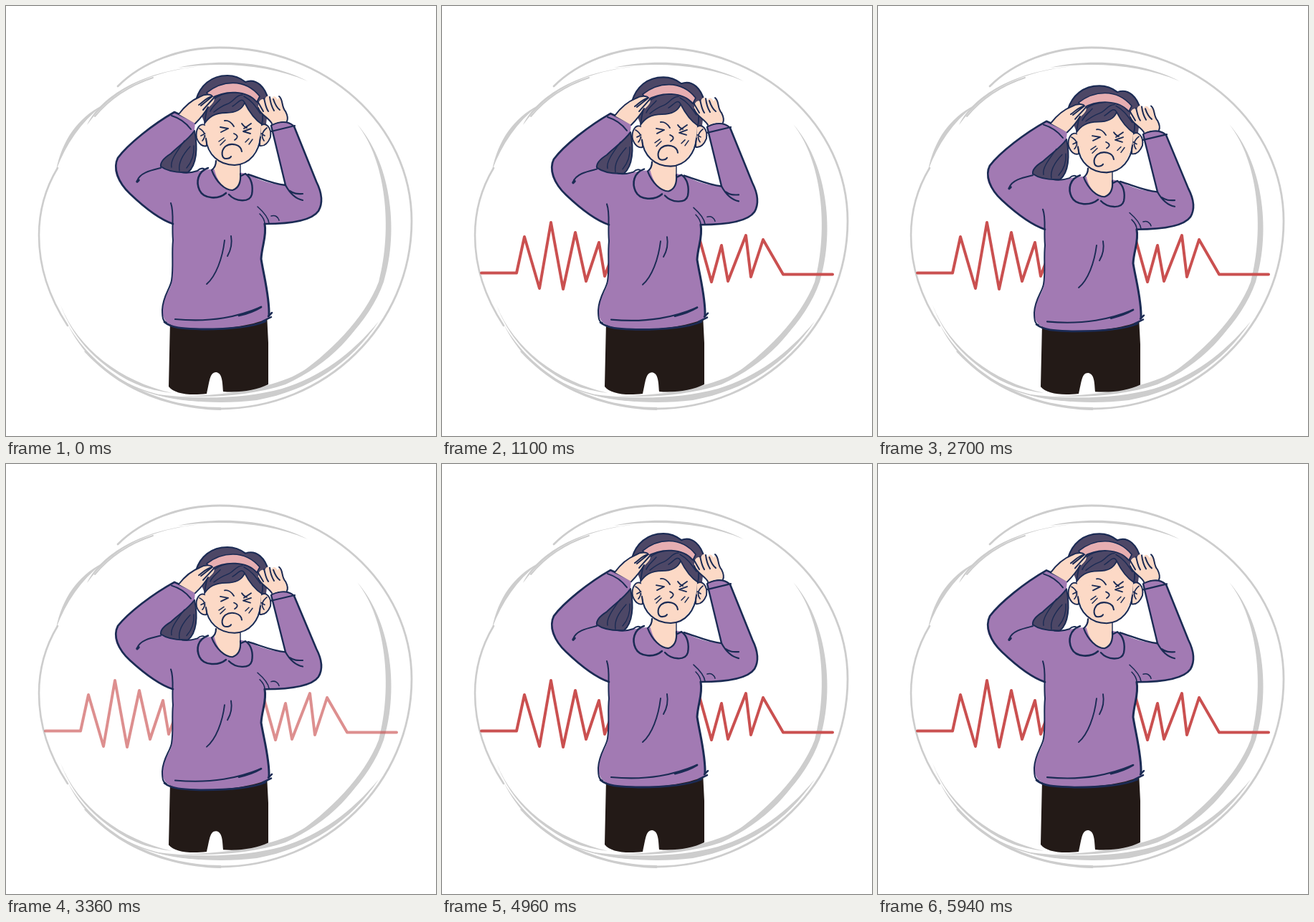
An HTML page with a canvas for the animation above (6000 ms loop, 600x600 px).

```html
<!DOCTYPE html>
<html lang="en">
<head>
<meta charset="utf-8">
<title>Stress</title>
<style>
html, body { margin: 0; width: 100%; height: 100%; overflow: hidden; background: #fff; }
canvas { display: block; width: 600px; height: 600px; }
</style>
</head>
<body>
<canvas id="stage" width="600" height="600"></canvas>
<script>
const ctx = document.getElementById('stage').getContext('2d');
const NAVY = '#1b2b54', PURPLE = '#a27ab3', SKIN = '#fcd9c6', HAIR = '#4d4766',
      BAND = '#e6aeb1', PANTS = '#231a17', GRAY = '#cdcdcd', RED = '#ca5050';

const STEP = 20, CYCLE = 149, STEPS = 298, LOOP = 6000;
const BEAT = 50, SQUASH = 0.05, FLOOR = 542, FADE = 30;

ctx.lineCap = ctx.lineJoin = 'round';

function fill(d, color) {
  ctx.fillStyle = color;
  ctx.fill(new Path2D(d));
}
function line(d, width = 2, color = NAVY) {
  ctx.strokeStyle = color;
  ctx.lineWidth = width;
  ctx.stroke(new Path2D(d));
}
function shape(d, color, width = 2) {
  fill(d, color);
  line(d, width);
}

function ring() {
  line('M156 112C190 78 243 58 298 58C446 58 566 166 566 300C566 445 446 562 298 562', 2.8, GRAY);
  line('M72 226C54 256 46 290 46 320C46 364 61 408 86 446', 2.6, GRAY);
  // tapered brush strokes
  fill('M490 165C535 215 550 310 527 385C508 440 455 493 400 520C450 486 500 437 520 385C540 310 530 215 490 165Z', GRAY);
  fill('M512 405C496 452 452 500 390 528C345 543 290 547 245 544C310 544 362 533 400 517C446 494 486 455 512 405Z', GRAY);
  fill('M520 440C482 498 425 536 350 550C300 556 250 553 205 541C262 549 330 549 385 534C438 518 482 486 520 440Z', GRAY);
  fill('M76 417C100 478 160 524 232 540C200 536 186 530 168 521C122 495 92 460 76 417Z', GRAY);
  fill('M86 444C125 512 205 560 300 560L300 564C205 562 122 518 86 444Z', GRAY);
  fill('M272 84C205 91 152 113 113 166C133 125 190 91 272 84Z', GRAY);
  fill('M134 139C105 162 84 192 70 229C78 188 100 156 134 139Z', GRAY);
  fill('M240 86C300 72 370 78 421 105C370 83 306 77 240 86Z', GRAY);
  line('M124 154C144 130 169 112 205 100', 2, GRAY);
  line('M110 482C150 526 205 548 270 551', 1.5, GRAY);
}

function pulse(alpha) {
  ctx.globalAlpha = alpha;
  line('M55 372.5H104L115 322 136 394 152 302 169 395 186 316 201 384 219 330 227 377 236 353', 4, RED);
  line('M356 313L376 385 390 334 399 384 424 320 431 378 448 326 476 374.4H545', 4, RED);
  ctx.globalAlpha = 1;
}

function body() {
  fill('M229 440L227 531C235 541 255 544 280 541C284 525 284 511 293 511C302 512 302 525 303 538C325 540 350 536 366 528L366 470 364 430Z', PANTS);
  fill('M235 148L264 163 262 182 250 200 244 233 270 230C290 225 320 230 338 235C355 244 372 249 390 250L370 165C380 160 394 159 402 167L433 245C440 259 443 274 436 286C428 299 400 304 361 304C364 322 357 334 356 352C360 380 368 410 368 434C350 446 300 452 260 451C226 449 218 440 218 423C219 405 231 397 232 380C234 350 231 330 233 304C215 297 195 283 173 262C158 248 148 234 154 216C164 196 205 165 235 148Z', PURPLE);
  line('M264 162C254 157 244 152 235 148C205 165 170 193 156 212C149 226 156 246 173 262C195 283 215 298 233 304', 2.7);
  line('M230 275C235 289 231 306 233 327C231 346 234 364 231 383C229 395 219 404 218 424C218 435 219 440 224 442');
  line('M221 441C233 451 254 450 274 451C310 451 343 448 362 440', 2.8);
  line('M358 440L370 434M366 433L371 428', 2.5);
  line('M361 304C364 322 357 334 356 353C360 378 368 407 367 432', 3);
  line('M361 304C400 304 427 299 436 286C443 274 440 259 433 245L402 168', 2.6);
  line('M370 167L390 250C371 248 357 241 338 235', 2.4);
  line('M371 166C381 161 393 160 401 167M370 175L403 167', 2.2);
  line('M231 153C244 157 252 164 258 172', 2);
  line('M183 244C187 232 204 229 216 226');
  line('M183 245L185 243', 3.5);
  line('M390 250C397 263 404 269 414 271M396 258C403 263 408 262 414 262', 2.2);
  line('M351 280C360 288 366 295 367 303M354 290C359 295 361 300 361 304M370 293C376 291 380 295 381 299', 1.6);
  line('M305 327C302 352 293 377 280 388M314 321C316 332 313 342 309 349', 1.9);
  line('M236 437C288 442 325 433 356 420', 2.2);
  line('M325 432C338 429 348 425 356 420', 2.8);
}

function ponytail() {
  shape('M263 174C255 186 240 196 230 206C222 211 215 217 216 224C223 229 236 233 254 232C266 222 268 198 263 174Z', HAIR, 2);
  line('M249 188C237 205 229 216 231 225M257 196C246 208 240 219 242 230M262 195C263 210 258 219 252 226', 1.4);
  line('M245 232C254 234 261 232 267 230 270 227 273 226 276 227');
}

function neck() {
  fill('M293 212L291 229C295 246 306 257 315 257C324 254 328 246 327 233L327 214Z', SKIN);
  line('M293 216C293 223 291 226 287 229C293 245 305 257 316 257C325 254 328 246 327 234', 2.2);
  line('M327 219V236', 1.4);
  line('M282 226C267 231 265 246 270 257C276 270 297 270 307 261', 2.6);
  line('M311 263C320 273 340 275 343 263C345 252 343 240 334 234L328 237', 2.4);
}

function head() {
  fill('M265 132C271 111 286 97 309 97C321 97 329 102 334 106C350 100 362 114 367 133L362 172 340 155 278 166Z', HAIR);
  shape('M279 167C270 161 264 173 266 184C269 193 275 197 280 195Z', SKIN, 1.9);
  shape('M355 167C363 161 371 170 369 183C365 193 360 196 354 195Z', SKIN, 1.9);
  line('M270 171C277 175 280 181 274 188M278 178L272 181M364 170C358 175 355 181 360 188M356 178L361 181', 1.7);
  fill('M278 163C276 192 289 222 319 222C345 220 356 193 356 164C348 153 340 142 333 135C318 147 293 143 278 163Z', SKIN);
  line('M279 185C281 207 297 222 319 222C341 221 353 203 355 183', 2.1);
  shape('M277 164C279 148 281 135 291 129C303 120 325 117 342 126C354 132 361 148 357 165C348 159 340 149 333 135C329 145 321 149 307 149C291 149 283 155 277 164Z', HAIR, 1.8);
  line('M330 124C320 124 318 134 308 137C300 140 295 144 290 148M333 135C329 126 323 136 316 140M332 126C343 132 348 140 355 150M299 130C293 137 288 140 285 147', 1.5);
  shape('M280 121C301 104 333 100 354 126L350 134C336 117 306 117 286 129Z', BAND, 1.7);
  line('M265 131C271 111 286 97 309 97C321 97 329 102 334 106C350 100 362 114 366 131', 2.2);
}

function hands() {
  fill('M241 151C250 139 260 132 270 127C278 122 287 122 288 126C294 130 289 136 282 142C277 150 271 157 264 164Z', SKIN);
  line('M241 151C250 139 260 131 270 127C278 122 286 123 288 126L272 139M288 126C279 128 275 134 269 138M290 128C285 134 280 139 275 145M282 141C277 150 271 157 264 164', 2);
  fill('M371 165C367 156 354 151 352 142C351 132 357 128 361 131C363 124 368 124 370 130C373 124 377 126 379 131C382 124 386 128 387 139C390 146 394 153 393 161C386 160 379 161 371 165Z', SKIN);
  line('M371 164C367 156 355 152 352 142M351 133L359 147M360 129C362 136 362 141 366 147M368 127C369 136 371 141 374 146M373 130C375 136 378 142 382 145M381 126C387 130 384 141 390 147C393 153 394 157 392 161', 2);
}

function face() {
  line('M305 160C310 159 315 163 318 168M299 169L310 171 300 176', 1.9);
  line('M329 164C331 167 333 169 336 170M342 164L332 171M342 171L331 175 341 178', 1.9);
  line('M318 178C323 180 325 183 319 187', 1.8);
  line('M329 203C328 193 314 190 306 196C299 203 301 213 307 213C311 213 313 212 314 210', 2.1);
  line('M297 189L304 184M299 194L306 187M334 190L339 185M339 193L344 186', 1.5);
}

function draw(step) {
  const frame = step % CYCLE;
  const swing = 1 - Math.abs(frame % BEAT / (BEAT / 2) - 1);
  const ease = swing * swing * (3 - 2 * swing);

  ctx.fillStyle = '#fff';
  ctx.fillRect(0, 0, 600, 600);
  ring();
  pulse(Math.min(1, frame / FADE));

  ctx.save();
  ctx.translate(0, FLOOR);
  ctx.scale(1, 1 - SQUASH * ease);
  ctx.translate(0, -FLOOR);
  [body, ponytail, neck, head, hands, face].forEach(part => part());
  ctx.restore();
}

const start = performance.now();
function tick() {
  const time = (performance.now() - start) % LOOP;
  draw(Math.min(STEPS - 1, Math.floor(time / STEP)));
  requestAnimationFrame(tick);
}
tick();
</script>
</body>
</html>
```
